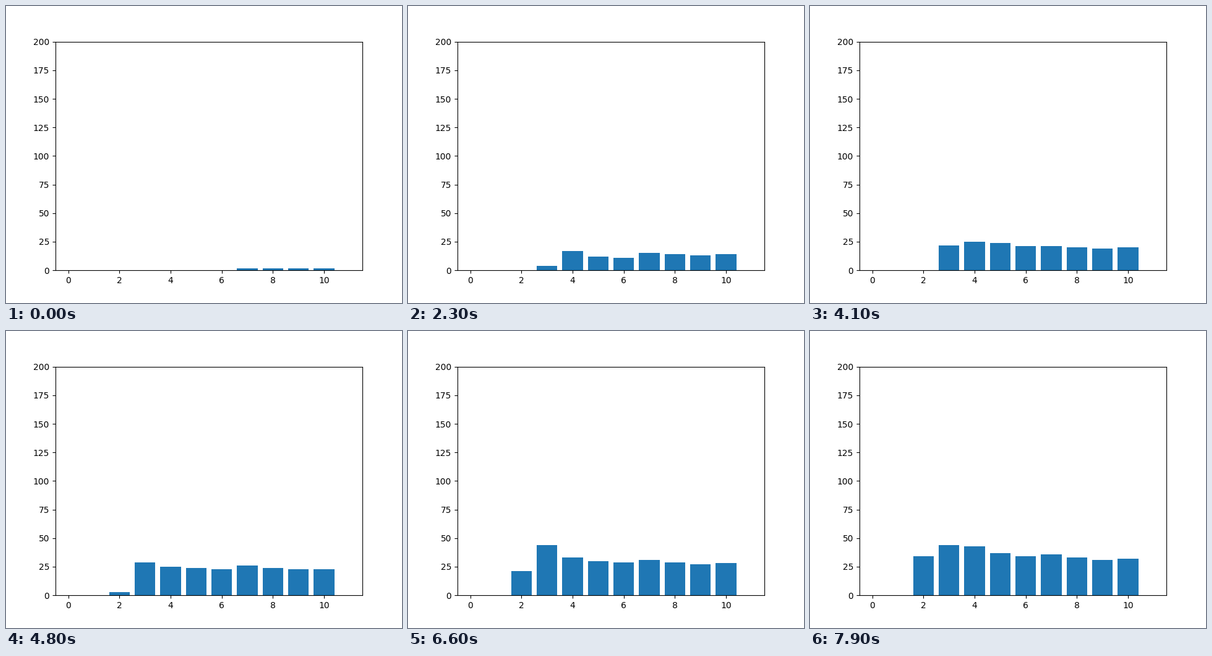
These frames come from a looping animation (640x480 px, 8 s). A matplotlib script:

```python
import numpy as np
import matplotlib.pyplot as plt
from matplotlib.animation import FuncAnimation

FRAMES = 80
BARS = 12
LAST = 10


def quads():
    """Sets of four bars in a revolving-door order, with a few sets skipped."""
    for a in range(6, -1, -1):
        for b in range(a + 1, LAST - 1):
            for c in range(LAST - 1, b, -1):
                for d in range(c + 1, LAST + 1):
                    tail = c == LAST - 1
                    if tail and b == a + 1:
                        continue
                    if (c, d) == (LAST - 2, LAST - 1):
                        continue
                    if not tail and c == b + 1 and d == LAST:
                        continue
                    yield [a, b, c, d]


def build_counts():
    counts = np.zeros((FRAMES, BARS), dtype=int)
    counts[:, 7:LAST + 1] = 2
    for i, quad in zip(range(1, FRAMES), quads()):
        counts[i:, quad] += 1
    return counts


counts = build_counts()

fig, ax = plt.subplots(figsize=(6.4, 4.8), dpi=100)
bars = ax.bar(range(BARS), counts[0], color="#1f77b4")
ax.set_xlim(-0.5, 11.5)
ax.set_ylim(0, 200)


def update(i):
    for bar, height in zip(bars, counts[i]):
        bar.set_height(height)
    return list(bars)


anim = FuncAnimation(fig, update, frames=FRAMES, interval=100,
                     repeat=True, repeat_delay=0)
plt.show()
```
